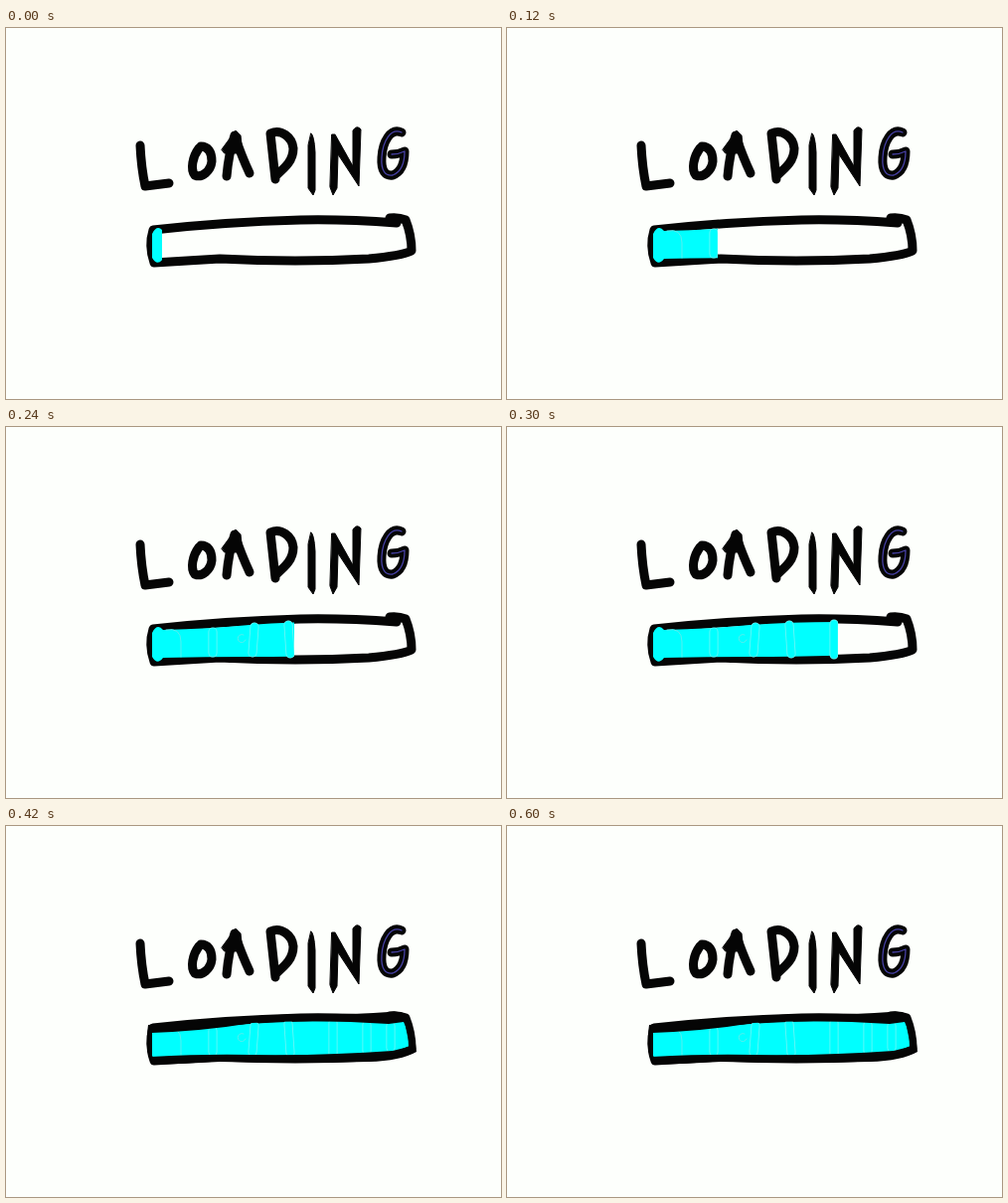
These frames come from a looping animation (498x373 px, 0.66 s). An HTML page:

```html
<!DOCTYPE html>
<html lang="en">
<head>
<meta charset="utf-8">
<title>Loading</title>
<style>
  html, body { margin: 0; width: 100%; height: 100%; overflow: hidden; background: #fdfffc; }
  svg { display: block; width: 498px; height: 373px; }
  path { stroke-linecap: round; stroke-linejoin: round; }
  .ink { fill: none; stroke: #050505; stroke-width: 9; }
  .solid { fill: #050505; stroke: #050505; stroke-width: 1; }
  .glint { fill: none; stroke: #4640a4; stroke-width: 1.3; }
  .cyan { fill: #00ffff; }
  .seam { fill: none; stroke: #72f5f5; stroke-width: 9; }
  .core { fill: none; stroke: #00ffff; stroke-width: 7.4; }
  .mark { fill: none; stroke: #58eeee; }

  #fill {
    clip-path: inset(0 calc(498px - var(--end)) 0 0);
    animation: grow 660ms step-end infinite;
  }
  #rim { animation: thicken 660ms step-end infinite; }

  /* one step every 60 ms */
  @keyframes grow {
    0%     { --end: 157px; }
    9.09%  { --end: 177px; }
    18.18% { --end: 212px; }
    27.27% { --end: 254px; }
    36.36% { --end: 290px; }
    45.45% { --end: 333px; }
    54.54% { --end: 391px; }
    63.63%, 100% { --end: 412px; }
  }
  @keyframes thicken {
    0% { visibility: hidden; }
    54.54%, 100% { visibility: visible; }
  }
</style>
</head>
<body>
<svg viewBox="0 0 498 373" role="img" aria-label="Loading">
  <defs>
    <path id="seams" d="M208 206V227 M250 201L248 227 M284 199L286 228 M329 198V229 M363 200V226 M387 201V223"/>
    <path id="g" d="M398 105C387 100 379 114 378 130C377 144 382 149 389 148C397 145 401 137 401 124Q395 127 388 127"/>
  </defs>

  <g id="letters">
    <path class="ink" d="M135 118Q136 140 140 159L164 156"/>
    <path class="ink" d="M194 121C188 129 185 142 190 148C197 151 206 144 207 134C207 124 203 119 196 119"/>
    <path class="ink" d="M222 149Q224 126 230 108Q237 129 245 146"/>
    <path class="solid" d="M217 122L231 103L236 108L238 126L220 126Z"/>
    <path class="ink" d="M266 106L271 152M266 106C277 101 288 110 289 121C289 134 280 141 272 148"/>
    <path class="solid" d="M307 106Q310 108 311 125V163L309 168L304 161V118Z"/>
    <path class="solid" d="M328 107H331L349 139V103Q353 97 357 102L355 159L334 127L333 161L329 168L326 160Z"/>
    <use href="#g" class="ink"/>
    <use href="#g" class="glint"/>
  </g>

  <path class="ink" d="M393 196Q340 192 296 193Q220 195 148 203Q143 219 149 236Q181 234 215 232Q292 236 365 232Q398 229 408 224Q408 208 402 193Q395 190 386 191"/>

  <g id="fill">
    <!-- keeps the clip box equal to the stage -->
    <rect width="498" height="373" fill="none"/>
    <path class="cyan" d="M147 207Q152 197 158 204Q205 203 245 199Q310 194 401 197L406 221L389 228Q310 231 245 231Q200 231 158 232Q152 240 147 231Z"/>
    <use href="#seams" class="seam"/>
    <use href="#seams" class="core"/>
    <path class="mark" d="M161 204Q176 201 176 216V231M239 209a4 4 0 1 0 2 5"/>
  </g>

  <path id="rim" fill="#050505" fill-rule="evenodd" d="M143 200Q220 192 295 189Q345 190 385 187Q395 185 405 190Q411 205 413 227Q397 236 365 237Q292 239 215 237Q181 239 147 240Q140 219 143 200ZM146 208V232Q200 229 245 230Q325 231 389 226L405 222Q405 206 400 197L385 199Q315 194 248 198Q200 206 146 208Z"/>
</svg>
</body>
</html>
```
